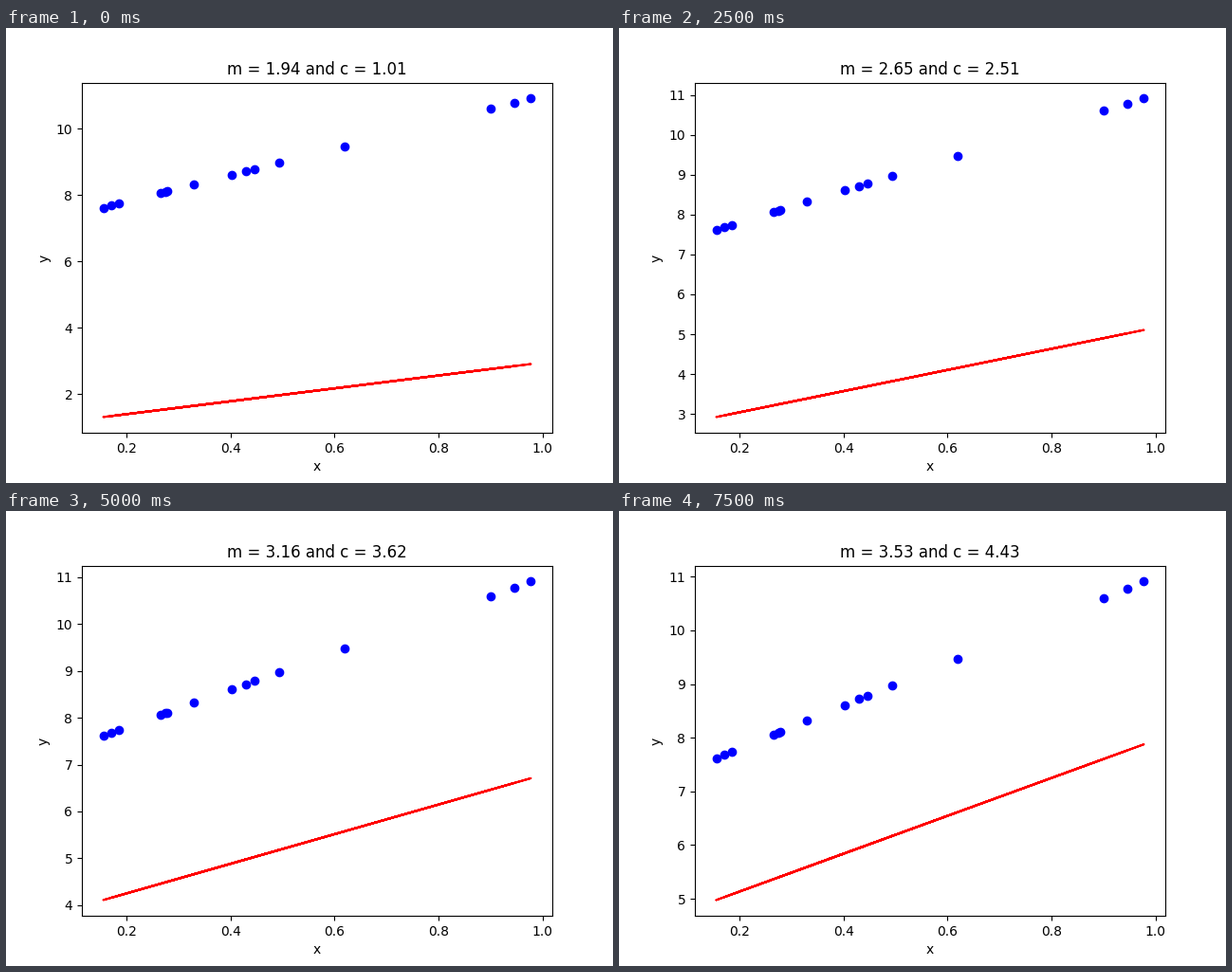
Recreate the animation shown at these times as a matplotlib script. Size 640 px wide and 480 px high, loop 8000 ms.

```python
import numpy as np
import matplotlib.pyplot as plt
from matplotlib.animation import FuncAnimation

FRAMES, INTERVAL = 16, 500

# Unsorted samples of y = 4x + 7; the fitted line runs back and forth over itself
x = np.array([0.430, 0.171, 0.946, 0.275, 0.494, 0.1554, 0.619, 0.330,
              0.9776, 0.266, 0.402, 0.900, 0.185, 0.446, 0.278])
y = 4 * x + 7


def approach(step, start, limit, keep):
    """Ease towards limit, keeping a fixed share of the distance each step."""
    return limit - (limit - start) * keep ** step


fig, ax = plt.subplots(figsize=(6.4, 4.8), dpi=100)


def draw(step):
    m = approach(step, 1.9425, 4.4385, 0.935)
    c = approach(step, 1.01, 6.70, 0.9406)
    ax.clear()
    ax.plot(x, y, "bo")
    ax.plot(x, m * x + c, color="red")
    ax.set_title(f"m = {round(m, 2)} and c = {round(c, 2)}")
    ax.set_xlabel("x")
    ax.set_ylabel("y")


anim = FuncAnimation(fig, draw, frames=FRAMES, interval=INTERVAL,
                     repeat=True, repeat_delay=0)
plt.show()
```
